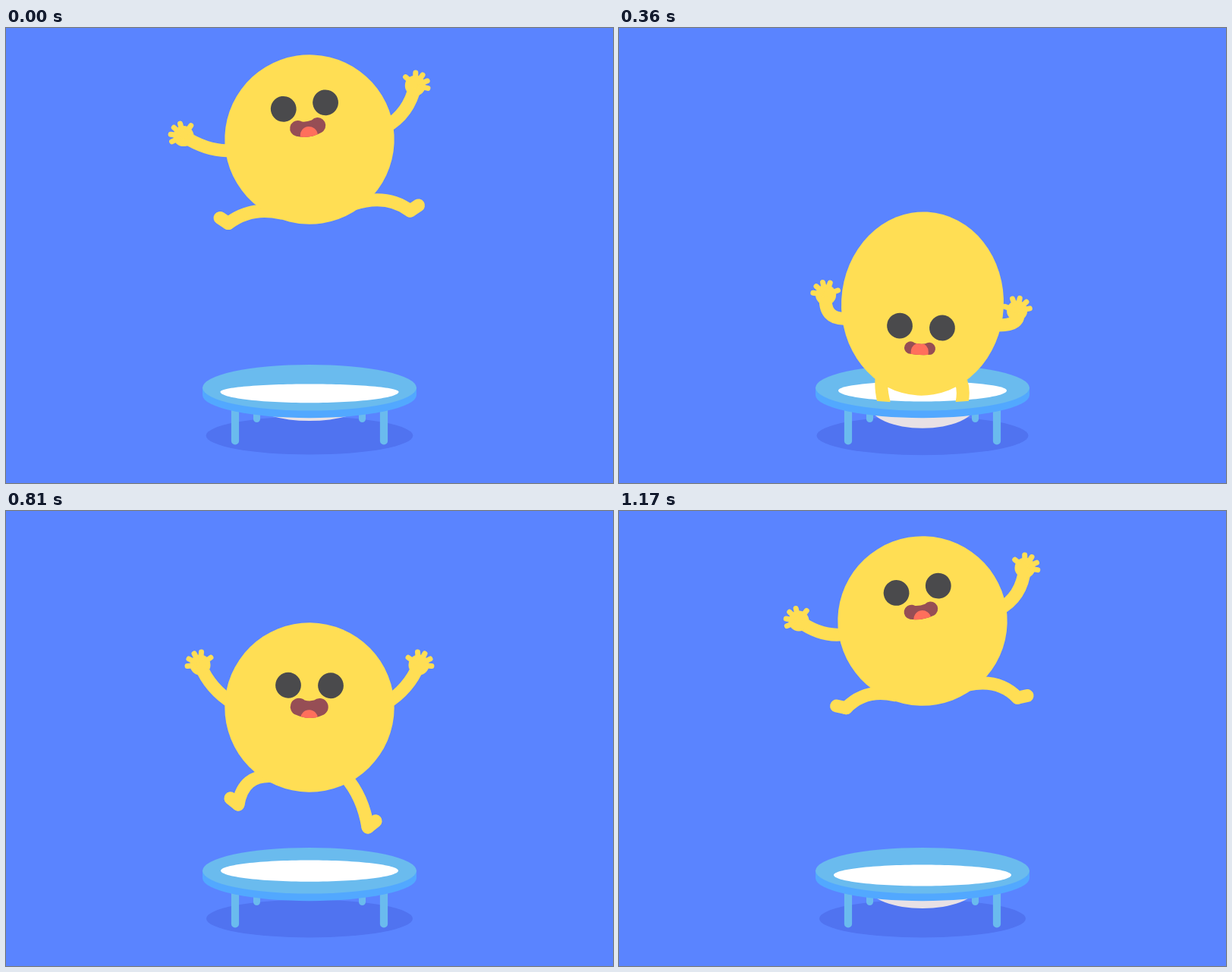
These frames come from a looping animation (800 px wide and 600 px high, 1200 ms). An HTML page with a canvas:

```html
<!DOCTYPE html>
<html lang="en">
<head>
<meta charset="utf-8">
<title>Trampoline</title>
<style>
html, body { margin: 0; width: 100%; height: 100%; overflow: hidden; background: #5a84ff; }
canvas { display: block; }
</style>
</head>
<body>
<canvas id="stage" width="800" height="600"></canvas>
<script>
const ctx = document.getElementById('stage').getContext('2d');
const LOOP = 1200, JUMP = 600, STEP = 30, APEX = 145, RADIUS = 111.7, TAU = Math.PI * 2;
const C = {
  sky: '#5a84ff', shadow: '#5073f0', ring: '#6abbee', skirt: '#52a8ff', under: '#e8e1e5',
  skin: '#ffde54', eye: '#4a4a4c', mouth: '#964e55', tongue: '#ff6f5c'
};
const rad = deg => deg * Math.PI / 180;
const clamp = x => Math.min(1, Math.max(0, x));
const smooth = x => (x = clamp(x)) * x * (3 - 2 * x);

// One jump in five beats: apex, drift, drop, land, launch.
const BEATS = [0, 120, 240, 390, 510];

// Smooth curve through a value per beat; wrap = -1 flips its sign from jump to jump.
function curve(s, values, wrap) {
  const at = k => {
    const lap = Math.floor(k / 5), i = k - lap * 5;
    return { t: BEATS[i] + lap * JUMP, v: values[i] * (lap ? wrap : 1) };
  };
  const slope = (l, m, r) => {
    const h0 = m.t - l.t, h1 = r.t - m.t;
    return ((m.v - l.v) / h0 * h1 + (r.v - m.v) / h1 * h0) / (h0 + h1);
  };
  const i = BEATS.findLastIndex(b => b <= s);
  const [p, a, b, c] = [at(i - 1), at(i), at(i + 1), at(i + 2)];
  const h = b.t - a.t, u = (s - a.t) / h, w = 1 - u;
  return a.v * w * w * (1 + 2 * u) + b.v * u * u * (3 - 2 * u) +
    h * u * w * (w * slope(p, a, b) - u * slope(a, b, c));
}

// Slow fall, fast rise, blended softly where the mesh catches the body.
function bodyY(s) {
  const fall = APEX + 114 * (s / 240) ** 1.95;
  const rise = APEX + 219 * ((JUMP - s) / 210) ** 1.907;
  return -20 * Math.log(Math.exp(-fall / 20) + Math.exp(-rise / 20));
}

function poseAt(time) {
  const t = time + STEP, s = t % JUMP, turn = Math.floor(t / JUMP) % 2 ? -1 : 1;
  const even = (...v) => curve(s, v, 1);
  const odd = (...v) => turn * curve(s, v, -1);
  const squash = Math.sin(Math.PI * clamp((s - 300) / 80));
  return {
    s, even, odd, y: bodyY(s),
    stretch: 0.0225 * (JUMP - s) * smooth((s - 340) / 50) - 2 * squash,
    tilt: odd(-9.6, -4.6, -0.5, 3, 9.7),
    sway: odd(1, 0.5, 0, 0.1, -0.65),
    kick: odd(0.45, 0.85, 1, 0, -0.2)
  };
}

function ellipse(x, y, rx, ry, color, turn = 0) {
  ctx.fillStyle = color;
  ctx.beginPath();
  ctx.ellipse(x, y, rx, ry, turn, 0, TAU);
  ctx.fill();
}

function line(x1, y1, x2, y2, width, color) {
  ctx.strokeStyle = color;
  ctx.lineWidth = width;
  ctx.beginPath();
  ctx.moveTo(x1, y1);
  ctx.lineTo(x2, y2);
  ctx.stroke();
}

function limb(x1, y1, bendX, bendY, x2, y2) {
  ctx.strokeStyle = C.skin;
  ctx.lineWidth = 17;
  ctx.beginPath();
  ctx.moveTo(x1, y1);
  ctx.quadraticCurveTo(bendX, bendY, x2, y2);
  ctx.stroke();
}

function drawMesh({ even }) {
  const w = even(117, 117, 117, 111, 112);
  const rim = even(480, 473.5, 474.3, 478, 470);
  const top = even(466.5, 456.5, 460.5, 466, 419);
  const up = rim - top, flare = Math.max(0, up - 14) * 1.5, crown = 64 - flare / 4;
  const k = 0.55, drop = 14.5;
  ctx.fillStyle = '#fff';
  ctx.beginPath();
  ctx.moveTo(400 - w, rim);
  ctx.bezierCurveTo(400 - w + flare, rim - up * k, 400 - crown, top, 400, top);
  ctx.bezierCurveTo(400 + crown, top, 400 + w - flare, rim - up * k, 400 + w, rim);
  ctx.bezierCurveTo(400 + w, rim + drop * k, 400 + w * k, rim + drop, 400, rim + drop);
  ctx.bezierCurveTo(400 - w * k, rim + drop, 400 - w, rim + drop * k, 400 - w, rim);
  ctx.fill();
}

function drawTrampoline(pose) {
  const { s, y, even } = pose;
  const shade = even(136, 136, 136, 139.5, 133);
  // Pushed down by the body, then swinging back once after the launch.
  const sag = Math.max(0, 31 + 0.6 * (y - 364), 27 - 0.2 * s, 27 - 0.5 * (JUMP - s));
  ellipse(400, 537.5, shade, shade * 0.184, C.shadow);
  for (const side of [-1, 1]) line(400 + side * 69.5, 490, 400 + side * 69.5, 515.5, 9, C.ring);
  ellipse(400, 497, 70, sag, C.under);
  for (const side of [-1, 1]) line(400 + side * 98, 490, 400 + side * 98, 544.5, 10.2, C.ring);
  ellipse(400, 484, 141, 30.2, C.skirt);
  ctx.fillRect(259, 474.3, 282, 9.7);
  ellipse(400, 474.3, 141, 30.3, C.ring);
  drawMesh(pose);
}

// Limbs are described for the left; side = 1 draws them mirrored and in counter-swing.
function drawArm({ even, sway }, side) {
  const swing = -side * sway;
  const x = even(-149, -161, -144, -126, -140) - 14 * swing;
  const y = even(-35, -35, -56, -1 + 14 * side, -5) + 35 * swing;
  const angle = even(-146, -154, -135, -120, -142) - 7 * swing;
  limb(-100, even(1, -2, -5, 24 + 6 * side, 16) + 16 * swing,
    -131, even(-4, -7, -24, 25 + 6 * side, 30) + 27 * swing, x, y);
  ellipse(x, y, 13.5, 13.5, C.skin);
  for (const spread of [-50, -17, 17, 50, 100]) {
    const a = rad(angle + spread);
    line(x, y, x + 17 * Math.cos(a), y + 17 * Math.sin(a), 7, C.skin);
  }
}

function drawLeg({ even, tilt, sway, kick }, side) {
  const lean = -side * tilt, dx = -side * 8.5 * (sway + kick), dy = -side * 15 * kick;
  const x = even(-113, -117, -85.5, -46, -63) + dx;
  const y = even(108, 104, 143, 150, 145) + dy;
  const toe = rad(even(12, 83, 39, -31, -49));
  limb(-48 - 1.2 * lean, 91 - 0.7 * lean,
    even(-88, -92, -79, -60, -86) + dx, even(82, 88, 103, 109, 113) + dy, x, y);
  line(x, y, x - 13 * Math.cos(toe), y - 13 * Math.sin(toe), 17, C.skin);
}

function drawMouth(w, tongue) {
  const r = 0.7 * w - 6.1, depth = 1.3 * w - 17.8;
  const s = w - r, cut = rad(50), low = rad(70);
  ctx.save();
  ctx.translate(0, 28.3);
  ctx.beginPath();
  ctx.arc(-s, 0, r, Math.PI - low, TAU - cut);
  ctx.quadraticCurveTo(0, -r * 0.62, s - r * Math.cos(cut), -r * Math.sin(cut));
  ctx.arc(s, 0, r, Math.PI + cut, TAU + low);
  ctx.quadraticCurveTo(0, 2 * depth - r * Math.sin(low), -s - r * Math.cos(low), r * Math.sin(low));
  ctx.fillStyle = C.mouth;
  ctx.fill();
  ctx.clip();
  line(0, tongue, 0, tongue + 20, 23, C.tongue);
  ctx.restore();
}

function drawJumper(pose) {
  const { even, odd, y, stretch, tilt } = pose;
  ctx.save();
  // The front of the ring hides whatever sinks into the mesh.
  ctx.beginPath();
  ctx.rect(0, 0, 800, 476);
  ctx.ellipse(400, 479.5, 117, 14.5, 0, 0, TAU);
  ctx.clip();
  ctx.translate(400, y);
  for (const side of [-1, 1]) {
    ctx.save();
    ctx.scale(-side, 1);
    drawArm(pose, side);
    drawLeg(pose, side);
    ctx.restore();
  }
  ellipse(0, 0, RADIUS - stretch, RADIUS + 2 * stretch, C.skin, rad(tilt));
  ctx.translate(odd(-6.8, -4, 0, -2, 4.7), even(-41.7, -47, -29, 30.5, -29.7));
  ctx.rotate(rad(tilt));
  for (const x of [-28, 28]) ellipse(x, 0, 16.9, 16.9, C.eye);
  drawMouth(even(22.5, 27.3, 25, 20.5, 20.5), even(11.6, 9.5, 15.5, 4.5, 12));
  ctx.restore();
}

function draw(now) {
  const pose = poseAt(Math.floor((now % LOOP) / STEP) * STEP);
  ctx.fillStyle = C.sky;
  ctx.fillRect(0, 0, 800, 600);
  drawTrampoline(pose);
  drawJumper(pose);
}

ctx.lineCap = ctx.lineJoin = 'round';
const start = performance.now();
function tick() {
  draw(performance.now() - start);
  requestAnimationFrame(tick);
}
tick();
</script>
</body>
</html>
```
